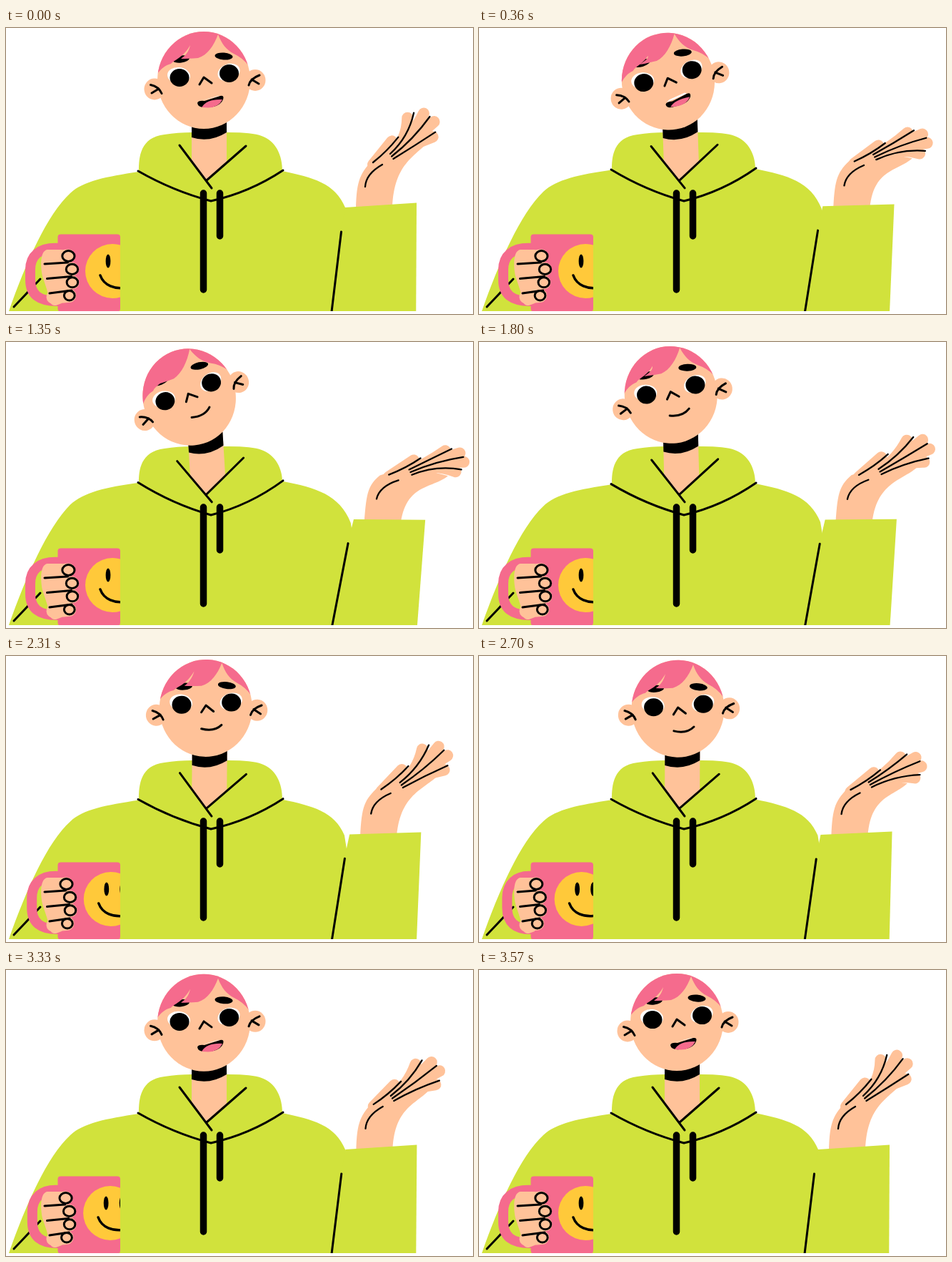
An HTML page with a canvas that plays this animation: 654 by 400 pixels, repeating every 3600 ms.

```html
<!DOCTYPE html>
<html lang="en">
<head>
<meta charset="utf-8">
<style>
html, body { margin: 0; width: 100%; height: 100%; overflow: hidden; background: #fff; }
canvas { display: block; }
</style>
</head>
<body>
<canvas id="stage" width="654" height="400"></canvas>
<script>
const ctx = document.getElementById('stage').getContext('2d');
const LOOP = 3600;
const GREEN = '#d1e23c', PINK = '#f56b8d', SKIN = '#ffc299', YELLOW = '#ffc93a', BLACK = '#000';

// Ease in and out between [time, value] keys.
const track = (...keys) => t => {
  const i = keys.findIndex(([time]) => time > t);
  const [t0, a] = keys[i - 1], [t1, b] = keys[i], u = (t - t0) / (t1 - t0);
  return a + (b - a) * u * u * (3 - 2 * u);
};
const tilt = track([0, 0], [720, 1], [1050, 1], [2400, -.13], [3000, 0], [LOOP, 0]);
const sway = track([0, 0], [720, 1], [980, 1], [LOOP, 0]);
const lift = track([0, 60], [520, 25], [1000, 24], [2250, 55], [2950, 30], [LOOP, 60]);
const nod = track([0, 0], [2350, 0], [3050, 6], [LOOP, 0]);
const mugTurn = track([0, 0], [1900, 0], [2900, 6], [3100, 6], [3550, 0], [LOOP, 0]);

function fill(d, color) {
  ctx.fillStyle = color;
  ctx.fill(new Path2D(d));
}
function line(d, width = 3, color = BLACK) {
  ctx.lineWidth = width;
  ctx.strokeStyle = color;
  ctx.stroke(new Path2D(d));
}
function oval(x, y, rx, ry, color, angle = 0) {
  ctx.beginPath();
  ctx.ellipse(x, y, rx, ry, angle, 0, 7);
  ctx.fillStyle = color;
  ctx.fill();
}
function group(draw) {
  ctx.save();
  draw();
  ctx.restore();
}
function spin(x, y, angle) {
  ctx.translate(x, y);
  ctx.rotate(angle);
  ctx.translate(-x, -y);
}
// A bent stroke rising at the given angle in degrees.
function ray(x, y, degrees, length, bend, width, color) {
  const c = Math.cos(degrees * Math.PI / 180), s = Math.sin(degrees * Math.PI / 180);
  const half = length / 2;
  line(`M${x} ${y}Q${x + half * c + bend * s} ${y - half * s + bend * c}
    ${x + length * c} ${y - length * s}`, width, color);
}

function drawHand(a, up) {
  const x = 538 + 10 * a, y = 177, spread = 6 + .13 * up;
  const angle = i => up - spread * i;
  const bend = i => .35 * (up - 30) - 5 * i;
  const low = angle(2.6) * Math.PI / 180;
  const edgeX = x + 55 * Math.cos(low), edgeY = y + 8 - 55 * Math.sin(low);
  fill(`M490 262C490 215 ${495 - 5 * a} ${205 - 2 * a} ${512 - 5 * a} ${186 + a}L${x} ${y - 6}
    L${edgeX} ${edgeY}C${edgeX - 20} ${edgeY + 20} 540 195 541 262Z`, SKIN);

  const thumbX = 514 + 6 * a, thumbY = 188 - 3 * a, thumbAngle = 18 + .45 * up;
  ray(thumbX, thumbY + 3, thumbAngle + 6, 42, 0, 16, SKIN);
  for (let i = 0; i < 4; i++)
    ray(x, y + 2, angle(i - .4), 79 - 7.5 * (i - 1.65) ** 2, bend(i - .5), 16, SKIN);

  ray(thumbX, thumbY, thumbAngle, 50, 3, 2.3, BLACK);
  for (let i = 0; i < 3; i++)
    ray(x + 2.2 * i, y - 1 + 3.5 * i, angle(i), 77 - 9 * (i - 1.1) ** 2, bend(i), 2.3, BLACK);
  line(`M${503 + 2 * a} ${222 - 2 * a}Q${504 + 4 * a} ${204 - 2 * a} ${527 + 7 * a} ${191 + a}`, 2.3);
}

function drawArm(a, up) {
  spin(522, 418, .075 * a);
  drawHand(a, up);
  fill('M475 251L575 244.5L574 440H450L469 285Z', GREEN);
  line('M469.5 285L452 430');
}

function drawBody(p) {
  fill(`M4 396C28 328 58 260 90 ${231 - 4 * p}C108 ${214 - 4 * p} 140 ${208 - 6 * p} 186 ${201 - 5 * p}
    C186 180 188 153 222 149Q240 146 262 146H312Q345 146 358 151C378 158 387 178 387 ${200 - 6 * p}
    C${430 + 5 * p} ${209 - 6 * p} ${461 + 7 * p} ${217 - 4 * p} ${475 + 9 * p} ${251 + 2 * p}
    L${479 + 9 * p} 276L485 396Z`, GREEN);
  group(() => {
    spin(285, 220, -.07 * p);
    fill('M260 128V187L281 213L309 187V125Z', SKIN);
    fill('M260 136L309 127V146Q285 161 260 153Z', BLACK);
    line('M243 164L288 224M336 165L281 213');
  });
  line(`M185 ${200 - 4 * p}Q234 ${228 - p} 287 242Q341 ${230 - 2 * p} 388 ${199 - 6 * p}`);
  line('M276.5 231V366M299.5 231V291', 9.5);
  line('M11 390L48 351');
}

function drawMouth(p, smiling) {
  if (smiling) return line('M272 102Q290 106 300 95.5');
  const bottom = 111 - 3 * p;
  fill(`M270 102L300 95L297 ${95 - 4 * p}L274 ${101 - 4 * p}Z`, '#fff');
  fill(`M268 105Q269 101 278 102L300 95Q306 94 304 100Q299 ${bottom} 281 ${bottom}Q269 112 268 105Z`, BLACK);
  fill(`M274 ${bottom}Q281 ${99 + 3 * p} 303 100Q298 ${bottom} 283 ${bottom + .5}Z`, PINK);
}

function drawHead(p, d, smiling) {
  spin(280.4, 143.6, -.344 * p);
  group(() => {
    ctx.translate(0, -.4 * d);
    oval(208, 85.5, 14.5, 15, SKIN);
    oval(349, 73, 14.5, 15, SKIN);
  });
  group(() => {
    ctx.translate(0, .25 * d);
    oval(277, 73, 65, 68, SKIN);
    ctx.clip();
    ctx.translate(0, .7 * d);
    oval(245, 43.5 - 4 * p, 12, 5, BLACK, -.12);
    oval(305 - 2 * p, 39.5 - 5 * p, 12.5, 5, BLACK, .08);
    const sweep = 6 * p;
    fill(`M205 72L212 64C217 57 223 52 231 50C236 44 248 42 ${258 - sweep} ${24 + 3 * sweep}
      C256 ${33 + sweep} 252 38 ${245 - sweep} 43Q${255 - sweep} 43 ${269 - sweep} 42
      C${282 - sweep} 38 ${291 - sweep / 2} 25 297 9C302 22 308 30 319 36Q332 42 340 53L360 53V-20H200Z`, PINK);
  });
  group(() => {
    ctx.translate(0, -.4 * d);
    line('M202.5 79.5Q214 82 218 91.5M204 91L214 85M355 66Q342 71 340 80M344 72L354 78');
  });
  ctx.translate(0, d - p);
  oval(242, 66.5, 16, 11.5, '#fff', .1);
  oval(312, 62, 16, 11.5, '#fff', -.35);
  oval(243, 69.5, 13.5, 12.5, BLACK);
  oval(312.5, 63.5, 13.5, 12.5, BLACK);
  line('M271 79L277 69L288 77');
  drawMouth(p, smiling);
}

function drawMug(q, t) {
  const left = 34 + q;
  line(`M75 308C${45 + q} 306 ${left} 320 ${left} 338V352C${left} 372 ${45 + q} 383 75 382`, 14, PINK);
  ctx.beginPath();
  ctx.roundRect(72.5, 288.5, 87.5, 108, 4);
  ctx.fillStyle = PINK;
  ctx.fill();
  group(() => {
    ctx.clip();
    ctx.translate(-q, 0);
    oval(149, 340, 38, 38, YELLOW);
    oval(143, 326, 3.4, 9.5, BLACK);
    oval(165, 326, 3.4, 9.5, BLACK);
    line('M132 346C137 360 152 366 170 363', 3.5);
  });

  fill('M58 310H78V385L70 388C60 389 61 378 57 365L51 347C47 325 50 311 58 310Z', SKIN);
  // The fingers tap one after another, lowest first.
  const fingers = [0, 1, 2, 3].map(i => {
    const away = Math.min(1, Math.abs(t - 860 + 190 * i) / 250);
    return [93.3 - 2.3 * (i - 1.6) ** 2 - 1.33 * q - 2 * (1 + Math.cos(Math.PI * away)), 319 + 18.4 * i];
  });
  for (const [x, y] of fingers) line(`M66 ${y + 2}L${x} ${y}`, 19, SKIN);
  fingers.forEach(([x, y], i) => {
    if (i < 3) line(`M${54 + 3.5 * i} ${330 + 20.5 * i}L${x - 1} ${328 + 19.5 * i}`);
    oval(x, y, 8.6 - .4 * i, 7.4 - .2 * i, SKIN);
    ctx.lineWidth = 3;
    ctx.strokeStyle = BLACK;
    ctx.stroke();
  });
}

function frame(now) {
  const t = now % LOOP, p = tilt(t);
  ctx.clearRect(0, 0, 654, 400);
  group(() => {
    ctx.beginPath();
    ctx.rect(0, 0, 654, 396);
    ctx.clip();
    ctx.lineCap = ctx.lineJoin = 'round';
    drawBody(p);
    group(() => drawArm(sway(t), lift(t)));
    group(() => drawHead(p, nod(t), t > 1300 && t < 3330));
    drawMug(mugTurn(t), t);
  });
  requestAnimationFrame(frame);
}
requestAnimationFrame(frame);
</script>
</body>
</html>
```
